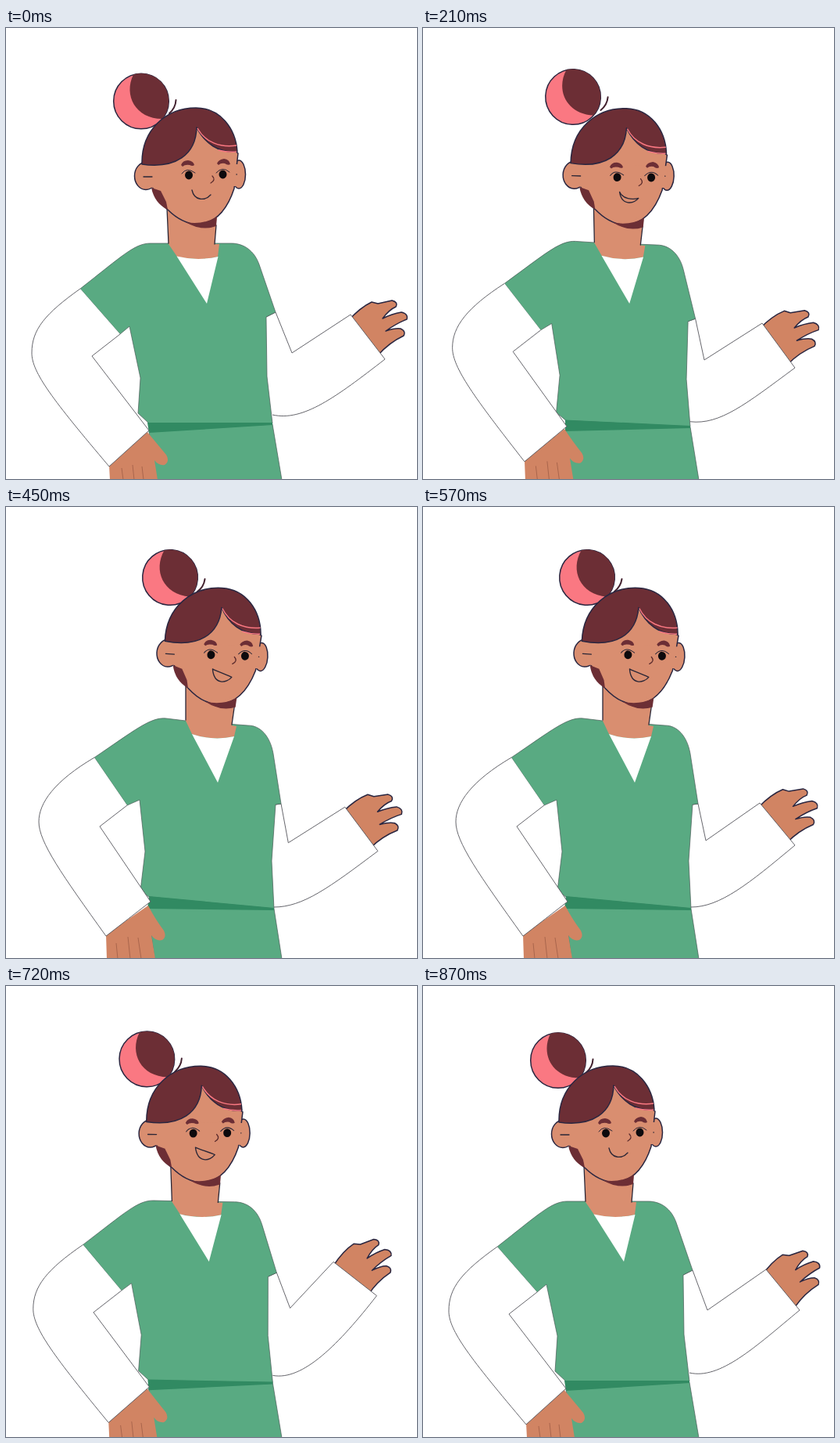
These frames come from a looping animation (526x576 px, 0.9 s). An HTML page:

```html
<!DOCTYPE html>
<html lang="en">
<head>
<meta charset="utf-8">
<title>Waving nurse</title>
<style>
  html, body { margin: 0; width: 100%; height: 100%; overflow: hidden; background: #fff; }
  svg { display: block; width: 100vw; height: 100vh; }
  .ink { fill: none; stroke: #2a2636; stroke-width: 1.3; stroke-linecap: round; stroke-linejoin: round; }
  .cloth { fill: #fff; stroke: #55555c; stroke-width: .9; }
  .green { fill: #59aa82; }
  .edge { stroke: #4a5a56; stroke-width: .7; }
  .skin { fill: #d98e70; }
  .hand { fill: #d18463; }
  .hair { fill: #6c2e35; }
  .rim { stroke: #2a2640; stroke-width: 1.5; stroke-linejoin: round; }
</style>
</head>
<body>
<svg viewBox="0 0 526 576">
  <g id="wave"><path class="hand rim" d="M438 374Q453 357 468 350L476 352 494 348Q502 350 499 356 490 360 482 371 494 365 506 363 515 365 513 372 500 377 486 387 498 383 505 384 512 387 509 393 490 402 476 418Z"/></g>
  <path id="foreArm" class="cloth"/>
  <path id="shirt" class="green edge"/>
  <path id="pants" class="green edge"/>
  <path id="band" fill="#318a62"/>
  <path id="neck" class="skin"/>
  <path id="neckLine" class="ink"/>
  <path id="collar" fill="#fff"/>
  <path id="restHand" class="hand"/>
  <path id="fingers" fill="none" stroke="#a9654c"/>
  <path id="restArm" class="cloth"/>
  <g id="bun">
    <circle class="rim" cx="173" cy="93.5" r="35.3" fill="#fa7882"/>
    <path class="hair" d="M163 59.5C150 86 166 116 200 116A35.3 35.3 0 0 0 163 59.5Z"/>
    <path class="ink" style="stroke:#43222f;stroke-width:2" d="M209 109Q217 102 217.500 92"/>
  </g>
  <g id="head">
    <ellipse class="skin rim" cx="298" cy="187" rx="8.500" ry="18"/>
    <ellipse class="skin rim" cx="179" cy="189" rx="14.500" ry="17.500"/>
    <path class="skin rim" d="M184 165L188 205Q196 225 207 232 225 250 246 251 278 248 292 205L297 160 240 120Z"/>
    <path class="skin" d="M180 174H298V202H291L280 226 252 248 226 244 207 231 189 204 182 203Z"/>
    <path class="hair" d="M186 204Q190 224 207 232L205 222 198 208Z"/>
    <path class="hair" d="M230 248Q252 252 270 241L269 253Q250 260 230 248Z"/>
    <path class="hair rim" d="M174 174C173 130 205 102 243 102 274 102 294 128 296 158 272 160 254 147 244 127 243 162 217 180 174 174Z"/>
    <path fill="none" stroke="#fa7882" stroke-width="1.500" d="M245 128C255 146 274 153 295 150M272 156Q284 159 295 158"/>
    <path class="ink" d="M176 190H187M295 187h.3"/>
    <g id="face">
      <path class="hair" d="M224 175Q226 169 233 169 240 170 241 175 239 177 235 175 229 174 226 177ZM270 173Q272 168 279 167 286 168 287 174 284 176 280 173 275 172 272 175Z"/>
      <path class="ink" style="stroke-width:1" d="M225 186Q231 177 242 185M269 185Q277 176 286 184"/>
      <ellipse class="eye" cx="234" cy="188" rx="5" fill="#0d0a0d"/>
      <ellipse class="eye" cx="277.500" cy="187" rx="5" fill="#0d0a0d"/>
      <path class="ink" style="stroke:#5a2a2c" d="M264 189Q269 194 262 198"/>
      <path id="mouth" class="ink"/>
    </g>
  </g>
</svg>
<script>
const LOOP = 900, STEP = 30;
const $ = id => document.getElementById(id);
const eyes = document.querySelectorAll('.eye');

// Each part upright and leaning; the numbers are blended pairwise.
const poses = {
  shirt: ['M208 275L185 275C165 275 150 290 95 333L146 391 158 381 172 447 169 492 183 505 341 505 334 445 333 369 345 363 324 302C318 285 305 275 288 275Z',
          'M230 273L205 270C185 268 165 285 113 320L155 381 171 374 178 440 172 490 183 498 343 513 340 452 345 380 352 379 342 315C338 292 325 279 310 279Z'],
  pants: ['M183 515L341 506 353 577 190 577Z', 'M181 511L343 513 353 577 190 577Z'],
  band: ['M181 504L341 504 341 507 183 517Z', 'M183 497L343 512 343 515 181 513Z'],
  neck: ['M206 220L208 276 219 292Q245 298 271 292L273 276 267 276 270 235Z',
         'M230 220L230 273 238 290Q265 299 292 293L295 280 289 279 294 238Z'],
  neckLine: ['M206 230L208 275M269 252L267 276', 'M230 224L230 272M293 250L289 278'],
  collar: ['M218.5 291.500Q245 298 271.5 292L257 352Z', 'M238 290Q265 299 292 293L271 352Z'],
  restArm: ['M95 333C50 365 33 385 33 415C33 440 60 475 132 560L183 514 110 419 146 391',
            'M113 320C62 350 42 378 42 402C42 428 72 470 128 548L185 504 120 408 155 381'],
  restHand: ['M132 558L180 515Q190 527 205 545 210 553 203 558 195 559 190 552L194 577 133 577Z',
             'M128 546L182 509Q190 525 202 541 206 549 200 553 192 555 186 547L191 577 129 577Z'],
  fingers: ['M148 562L150 577M162 558L164 577M174 560L176 577', 'M141 557L143 577M156 549L159 577M169 550L173 577']
};
const smile = ['M238 207C241 221 255 221 262 213C255 221 241 221 238 207Z',
               'M237 206C243 209 253 211 262 215C256 223 240 227 237 206Z'];

// time, cuff top x y, cuff bottom x y, elbow crease x y, hand turn, bun height
const arm = [
  [0,   441, 366, 485, 423, 366, 415, 0, 0],
  [210, 434, 377, 476, 434, 360, 424, 3, -5.5],
  [330, 435, 384, 476, 441, 361, 429, 4, -3.5],
  [570, 431, 378, 476, 432, 362, 426, 2.5, -3.5],
  [660, 424, 361, 477, 407, 365, 416, -5, -2],
  [780, 418, 348, 473, 391, 362, 409, -10, 1.5],
  [870, 439, 362, 482, 414, 364, 414, -6.5, 1.5]
];

const mix = (a, b, k) => a + (b - a) * k;
const ramp = (t, from, to) => {
  const u = Math.min(1, Math.max(0, (t - from) / (to - from)));
  return u * u * (3 - 2 * u);
};
const bump = (t, mid, half) => Math.max(0, 1 - Math.abs(t - mid) / half);

function blend([a, b], k) {
  const goal = b.match(/[\d.]+/g);
  let i = 0;
  return a.replace(/[\d.]+/g, n => mix(+n, +goal[i++], k).toFixed(2));
}

// Looping smooth curve through the rows of a table.
function curve(rows, t) {
  const n = rows.length;
  const row = (i, c) => rows[(i + n) % n][c] + (c ? 0 : LOOP * Math.floor(i / n));
  let i = n - 1;
  while (rows[i][0] > t) i--;
  const span = row(i + 1, 0) - row(i, 0), u = (t - row(i, 0)) / span;
  const slope = (j, c) => (row(j + 1, c) - row(j - 1, c)) / (row(j + 1, 0) - row(j - 1, 0)) * span;
  return rows[0].slice(1).map((_, k) => {
    const c = k + 1, v = 1 - u;
    return v * v * ((1 + 2 * u) * row(i, c) + u * slope(i, c))
         + u * u * ((1 + 2 * v) * row(i + 1, c) - v * slope(i + 1, c));
  });
}

function draw(t) {
  const lean = ramp(t, 85, 330) - ramp(t, 570, 780);
  const talk = ramp(t, 130, 300) - ramp(t, 785, 865);
  for (const id in poses) $(id).setAttribute('d', blend(poses[id], lean));

  const [ux, uy, lx, ly, cx, cy, turn, lift] = curve(arm, t);
  const endX = mix(341, 343, lean), endY = mix(494, 511, lean);
  $('foreArm').setAttribute('d',
    `M${mix(333, 345, lean)} ${mix(369, 380, lean)}L${mix(345, 352, lean)} ${mix(363, 379, lean)} ${cx} ${cy} ${ux} ${uy} ${lx} ${ly}` +
    `C${lx - (ly - uy) * 1.1} ${ly + (lx - ux) * 1.1} 380 ${mix(503, 511, lean)} ${endX} ${endY}`);
  $('wave').setAttribute('transform',
    `translate(${(ux + lx) / 2} ${(uy + ly) / 2}) rotate(${turn}) translate(-463 -394.5)`);

  $('bun').setAttribute('transform',
    `translate(${37 * lean} ${lift - 2 * bump(t, 270, 60)}) rotate(${4.5 * lean} 173 93.5)`);
  $('head').setAttribute('transform',
    `translate(${28.5 * lean} ${lean}) rotate(${3.3 * lean} 238 187)`);
  $('face').setAttribute('transform', `translate(0 ${2.3 * bump(t, 210, 110)})`);
  $('mouth').setAttribute('d', blend(smile, talk));
  const open = 5.4 * (1 - .9 * bump(t, 285, 60));
  eyes.forEach(e => e.setAttribute('ry', open));
}

const start = performance.now();
function tick() {
  const t = (performance.now() - start) % LOOP;
  draw(Math.floor(t / STEP) * STEP);
  requestAnimationFrame(tick);
}
tick();
</script>
</body>
</html>
```
